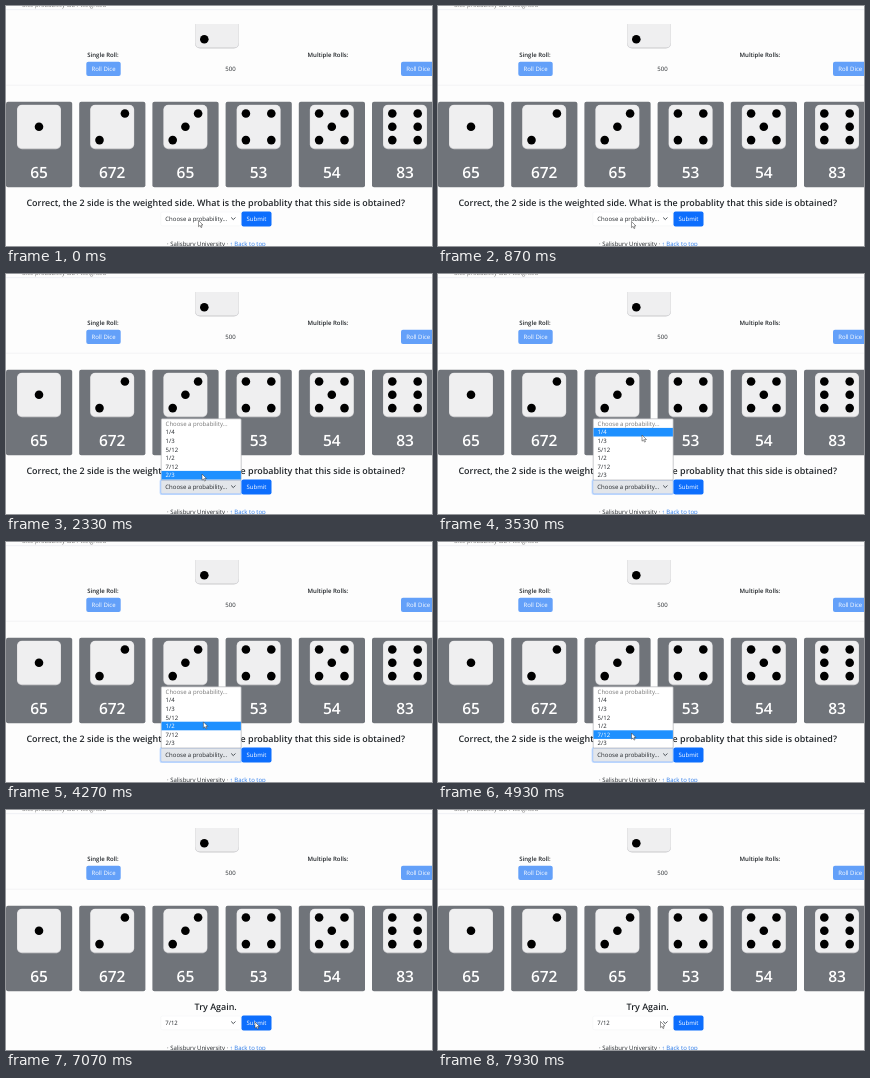
Animation, 426 px wide and 240 px high, one loop 8000 ms. Source, as an HTML page:

```html
<!DOCTYPE html>
<html lang="en">
<head>
<meta charset="utf-8">
<title>Weighted die</title>
<style>
  html, body { margin: 0; width: 100%; height: 100%; overflow: hidden; background: #fdfdfd; }
  svg { display: block; width: 100vw; height: 100vh; }
  text { font: 6px "Open Sans", "Noto Sans", sans-serif; fill: #212529; text-rendering: geometricPrecision; white-space: pre; }
  .bold { font-weight: 600; }
  .title { font-size: 8.95px; font-weight: 600; }
  .count { font-size: 15.5px; font-weight: 600; fill: #fff; }
  .white { fill: #fff; }
  .muted { fill: #777; }
  .middle { text-anchor: middle; }
</style>
</head>
<body>
<svg id="stage" viewBox="0 0 426 240"></svg>
<script>
const NS = "http://www.w3.org/2000/svg";
const stage = document.getElementById("stage");
const LOOP = 8000, STEP = 1000 / 15;
const OPEN = 1470, CHOSEN = 5270, SUBMITTED = 7000;
const QUESTION = "Correct, the 2 side is the weighted side. What is the probablity that this side is obtained?";
const PROMPT = "Choose a probability...";
const OPTIONS = [PROMPT, "1/4", "1/3", "5/12", "1/2", "7/12", "2/3"];
const ROW_TOP = 145.3, ROW = 8.6;

// Pointer positions: time, x, y
const PATH = [
  [0, 192.5, 214.5], [870, 193.5, 215.5], [1500, 194, 215],
  [2200, 196, 200], [2500, 196, 200], [3300, 204, 161], [3650, 204, 161],
  [4700, 193.5, 191], [5350, 193.5, 191], [5700, 205, 228],
  [6500, 250, 226], [6850, 249, 212], [7100, 249, 212], [7800, 222.5, 211.5], [8000, 222.5, 211.5]
];

function add(parent, tag, attrs, content) {
  const node = document.createElementNS(NS, tag);
  for (const key in attrs) node.setAttribute(key, attrs[key]);
  if (content !== undefined) node.textContent = content;
  return parent.appendChild(node);
}
const rect = (parent, x, y, width, height, rx, fill, more) =>
  add(parent, "rect", { x, y, width, height, rx, fill, ...more });
const text = (parent, x, y, content, cls = "") =>
  add(parent, "text", { x, y, class: cls }, content);

function die(parent, cx, cy, value) {
  rect(parent, cx - 22, cy - 22, 44, 44.4, 5, "#c9c9cc");
  rect(parent, cx - 21.7, cy - 21.7, 43.4, 43.2, 4.5, "#efeff0");
  const pips = [];
  if (value % 2) pips.push([0, 0]);
  if (value > 1) pips.push([-1, 1], [1, -1]);
  if (value > 3) pips.push([-1, -1], [1, 1]);
  if (value === 6) pips.push([-1, 0], [1, 0]);
  for (const [dx, dy] of pips)
    add(parent, "circle", { cx: cx + dx * 12.7, cy: cy + dy * 13.3, r: 4.3, fill: "#000" });
}

function button(x, width, y, height, fill, label) {
  rect(stage, x, y, width, height, 2, fill);
  text(stage, x + width / 2, y + height / 2 + 2.1, label, "white middle");
}

// Page
rect(stage, 0, 0, 426, 240, 0, "#fdfdfd");
die(stage, 211, 20, 2);
rect(stage, 0, 0, 426, 18, 0, "#fdfdfd");
text(stage, 16, 0.8, "dice probability lab / weighted", "muted");
rect(stage, 0, 3.4, 426, 0.7, 0, "#e9ebf2");
text(stage, 97, 50.6, "Single Roll:", "bold middle");
text(stage, 322, 50.6, "Multiple Rolls:", "bold middle");
text(stage, 219.3, 65.2, "500");
button(80.3, 34.4, 55.7, 14.3, "#63a0f9", "Roll Dice");
button(395, 34.4, 55.7, 14.3, "#63a0f9", "Roll Dice");
rect(stage, 0, 78.8, 426, 0.6, 0, "#ebebed");

[65, 672, 65, 53, 54, 83].forEach((count, i) => {
  const x = i * 73.2;
  rect(stage, x, 95.8, 66.2, 85.4, 2, "#70747a");
  die(stage, x + 33, 120.8, i + 1);
  text(stage, x + 33, 172, count, "count middle");
});

const title = text(stage, 209.7, 200.4, "", "title middle");
const footer = text(stage, 161, 240.4, "· Salisbury University · ");
add(footer, "tspan", { fill: "#2878e8" }, "↑ Back to top");

// Select box and its list
const ring = rect(stage, 153.6, 204.8, 82.6, 16.2, 2.6, "#c2dbfe");
const box = rect(stage, 154.8, 206, 80.2, 13.8, 1.6, "#fff", { "stroke-width": 0.5 });
const chosen = text(stage, 159.3, 215.1, "");
add(stage, "path", { d: "M225.2 211.5l2.1 2.1 2.1-2.1", fill: "none", stroke: "#343a40", "stroke-width": 0.9 });
button(235.5, 30, 205.5, 15, "#0d6efd", "Submit");

const list = add(stage, "g", {});
rect(list, 155.2, 144.8, 80, 61.2, 1, "#fff", { stroke: "#a5a7ab", "stroke-width": 0.6 });
const marker = rect(list, 155.5, 0, 79.4, ROW, 0, "#1e90ff");
const labels = OPTIONS.map((label, i) => text(list, 159.6, ROW_TOP + (i + 0.5) * ROW + 2.1, label));

const pointer = add(stage, "path", {
  d: "M0 0v6.2l1.5-1.3 1 2.2 1-.5-1-2.1h2z",
  fill: "#fff", stroke: "#333", "stroke-width": 0.5
});

function pointerAt(t) {
  const i = Math.max(1, PATH.findIndex(p => p[0] > t));
  const [t0, x0, y0] = PATH[i - 1], [t1, x1, y1] = PATH[i];
  const u = (t - t0) / (t1 - t0), ease = u * u * (3 - 2 * u);
  return [x0 + (x1 - x0) * ease, y0 + (y1 - y0) * ease];
}
const show = (node, visible) => node.setAttribute("visibility", visible ? "visible" : "hidden");

function draw(time) {
  const t = Math.floor(((time % LOOP) + 4) / STEP) * STEP % LOOP;
  const [x, y] = pointerAt(t);
  const open = t >= OPEN && t < CHOSEN;
  const focused = t >= OPEN && t < SUBMITTED - 100;

  title.textContent = t < SUBMITTED ? QUESTION : "Try Again.";
  chosen.textContent = t < CHOSEN ? PROMPT : "7/12";
  show(ring, focused);
  box.setAttribute("fill", open ? "#e3e6ea" : "#fff");
  box.setAttribute("stroke", focused ? "#86b7fe" : "#f1f2f4");

  show(list, open);
  const row = Math.floor((y - ROW_TOP) / ROW);
  const active = row > 0 && row < OPTIONS.length ? row : -1;
  show(marker, open && active > 0);
  marker.setAttribute("y", ROW_TOP + active * ROW);
  labels.forEach((label, i) => label.setAttribute("class", i === active ? "white" : i ? "" : "muted"));

  show(pointer, t < 5600 || t > 6600);
  pointer.setAttribute("transform", `translate(${x} ${y})`);
}

const start = performance.now();
function frame() {
  draw(performance.now() - start);
  requestAnimationFrame(frame);
}
frame();
</script>
</body>
</html>
```
